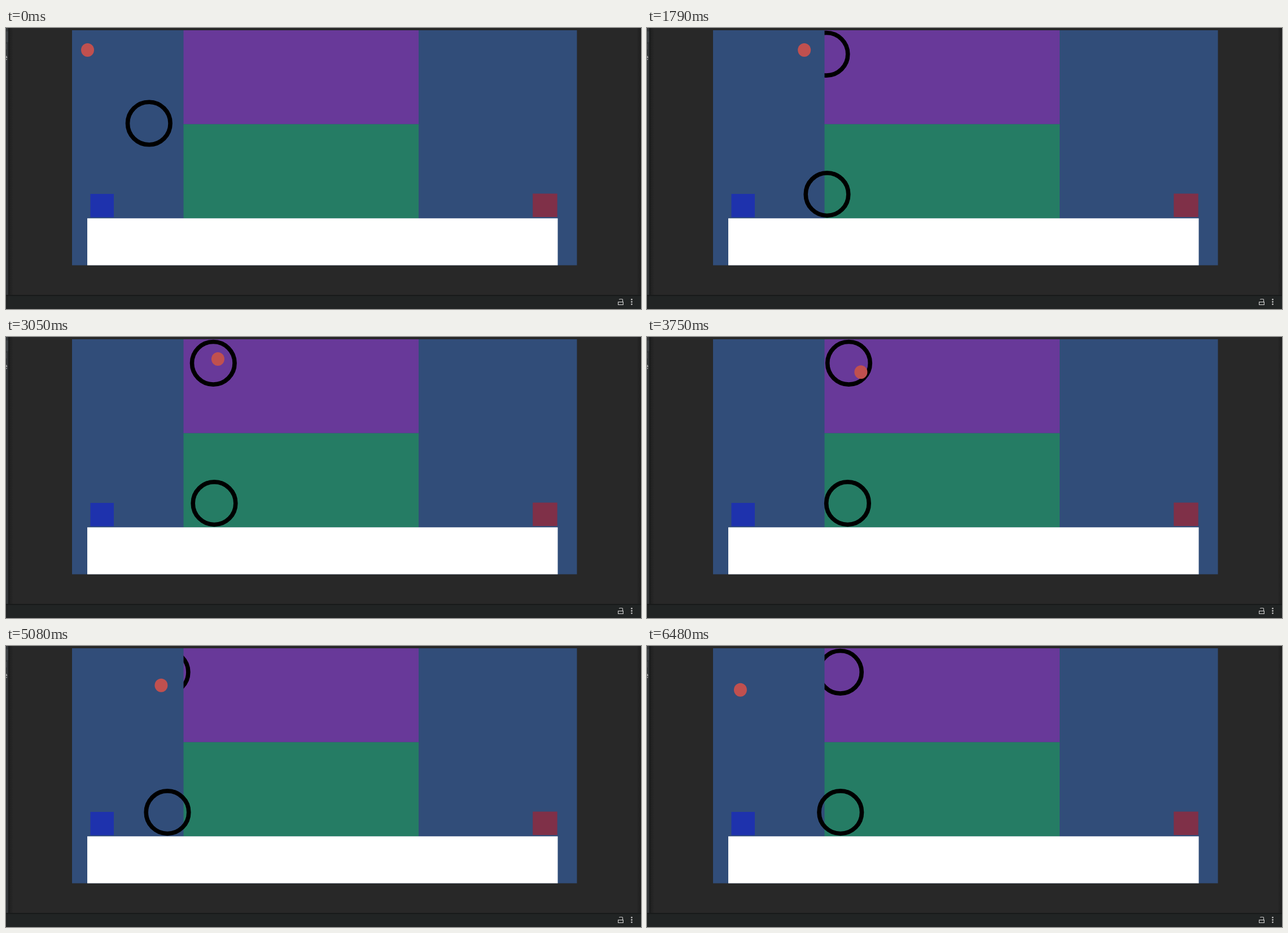
Recreate the animation shown at these times as an HTML page. Size 1125 by 498 pixels, loop 6550 ms.

```html
<!DOCTYPE html>
<html lang="en">
<head>
<meta charset="utf-8">
<title>Ring and ball</title>
<style>
html, body { margin: 0; width: 100%; height: 100%; overflow: hidden; background: #282828; }
svg { display: block; width: 100vw; height: 100vh; }
.ring { fill: none; stroke: #000; stroke-width: 7.6; }
text { font: 13px Inter, sans-serif; fill: #c4c4c4; }
</style>
</head>
<body>
<svg viewBox="0 0 1125 498">
  <defs>
    <clipPath id="view"><rect x="314.5" y="4" width="416.5" height="166.5"/></clipPath>
    <linearGradient id="shade">
      <stop stop-color="#1e1e1e"/><stop offset="1" stop-color="#282828"/>
    </linearGradient>
  </defs>
  <rect width="1125" height="498" fill="#282828"/>
  <rect x="5" width="8" height="473" fill="url(#shade)"/>
  <rect x="-1125" width="8" height="473" fill="url(#shade)" transform="scale(-1 1)"/>
  <rect width="4" height="473" fill="#333638"/>
  <rect y="6" width="4" height="19" fill="#3e4244"/>
  <rect x="4" width="2" height="473" fill="#191b1b"/>
  <text x="-2" y="38">l</text>
  <text x="-5" y="57">e</text>
  <rect y="473" width="1125" height="25" fill="#212424"/>
  <rect y="473" width="1125" height="2" fill="#181a1a"/>
  <g fill="none" stroke="#c4c4c4" stroke-width="1.2">
    <rect x="1084.6" y="485.6" width="8.8" height="4.8"/>
    <path d="M1086.5 481.5q0-1 1-1h4q1 0 1 1v4"/>
  </g>
  <path d="M1108.5 481.2v8.6" fill="none" stroke="#c4c4c4" stroke-width="2.8"
    stroke-linecap="round" stroke-dasharray="0 4.2"/>

  <rect x="117" y="4" width="894.5" height="416.5" fill="#314d79"/>
  <rect x="314.5" y="4" width="416.5" height="166.5" fill="#683999"/>
  <rect x="314.5" y="170.5" width="416.5" height="167" fill="#257c64"/>
  <rect x="149.5" y="294" width="41.5" height="41.5" fill="#1e32ad"/>
  <rect x="933.2" y="293.5" width="43.5" height="41.5" fill="#7f3048"/>
  <rect x="144" y="337.3" width="833.5" height="83.2" fill="#fff"/>
  <circle id="ring" class="ring" r="37.8"/>
  <g clip-path="url(#view)"><circle id="echo" class="ring" r="37.8"/></g>
  <ellipse id="ball" rx="11.5" ry="12" fill="#c0504f"/>
</svg>
<script>
const LOOP = 6550, HOLD = 270, STEP = 70, LAG = 35;
const $ = id => document.getElementById(id);

// [time, x] where the steered ring changes pace or direction
const turns = [[130, 253.3], [1790, 319], [2150, 326.5], [3050, 369], [3300, 381.5],
  [3680, 359.5], [4520, 311], [4990, 284.5], [5570, 314.5], [6550, 343]];

const rate = j => (turns[j + 1][1] - turns[j][1]) / (turns[j + 1][0] - turns[j][0]);

// Zero at the ends and where the direction flips
function slope(j) {
  if (j === 0 || j === turns.length - 1) return 0;
  const a = rate(j - 1), b = rate(j);
  return a * b > 0 ? 2 * a * b / (a + b) : 0;
}

// Hermite curve through the turns
function ringX(t) {
  t = Math.max(t, turns[0][0]);
  const i = turns.findIndex(turn => t < turn[0]) - 1;
  const [t0, x0] = turns[i], [t1, x1] = turns[i + 1];
  const d = t1 - t0, u = (t - t0) / d, v = 1 - u;
  return v * v * (1 + 2 * u) * x0 + u * u * (3 - 2 * u) * x1
    + d * u * v * (v * slope(i) - u * slope(i + 1));
}

// Free fall onto the floor
const ringY = t => Math.min(169 + 0.0002045 * Math.max(0, t - 25) ** 2, 294.7);

// Right, down the far side, then back left on a slight slant
function ballAt(t) {
  const right = 144.5 + 0.0768 * Math.max(0, t - 43);
  const left = 236.6 - 0.0782 * (t - 5570);
  const drop = 39 + 0.077 * (t - 3270);
  const slant = 72.6 + 0.0057 * (t - 5570);
  return [Math.min(right, left, 392), Math.max(39, Math.min(drop, slant))];
}

function place(id, x, y) {
  $(id).setAttribute("cx", x);
  $(id).setAttribute("cy", y);
}

function draw(now) {
  let t = now % LOOP;
  t = t < HOLD ? 0 : 250 + STEP * Math.floor((t - 240) / STEP);
  place("ring", ringX(t), ringY(t));
  place("echo", ringX(t - LAG), ringY(t) - 248.4);
  place("ball", ...ballAt(t));
}

const start = performance.now();
function tick() {
  draw(performance.now() - start);
  requestAnimationFrame(tick);
}
tick();
</script>
</body>
</html>
```
